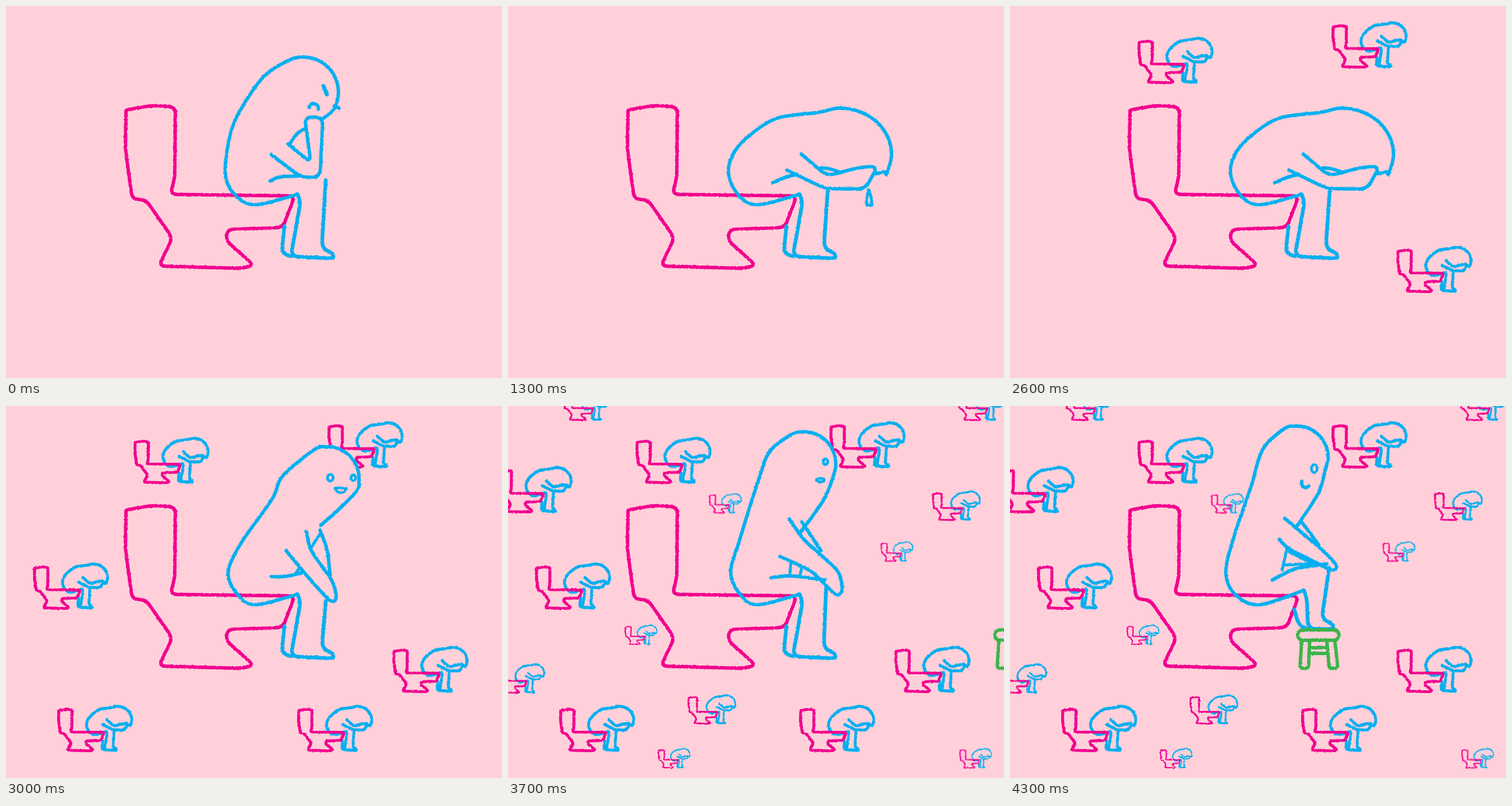
Animation, 864 px wide and 648 px high, one loop 4.8 s. Source, as an HTML page:

```html
<!DOCTYPE html>
<html lang="en">
<head>
<meta charset="utf-8">
<title>Thinking it over</title>
<style>
  html, body { margin: 0; width: 100%; height: 100%; overflow: hidden; background: #ffd0d9; }
  svg { display: block; width: 100vw; height: 100vh; }
  path, g { fill: none; stroke-linecap: round; stroke-linejoin: round; }
  .pink { stroke: #f2008f; }
  .blue { stroke: #04aff0; }
  .green { stroke: #3bb54a; }
</style>
</head>
<body>
<svg viewBox="0 0 864 648">
  <defs>
    <filter id="crayon" filterUnits="userSpaceOnUse" x="0" y="0" width="864" height="648" color-interpolation-filters="sRGB">
      <feTurbulence type="fractalNoise" baseFrequency="0.3" numOctaves="2" seed="4"/>
      <feDisplacementMap in="SourceGraphic" scale="3" xChannelSelector="R" yChannelSelector="G"/>
    </filter>
    <g id="mini">
      <path id="miniFigure" class="blue" stroke-width="18" transform="translate(-57 -57) scale(.277 .293)"/>
      <path id="miniToilet" class="pink" stroke-width="19" transform="scale(.27 .255) translate(-206 -172)"/>
    </g>
  </defs>
  <g filter="url(#crayon)">
    <g id="crowd"></g>
    <path id="fill" style="fill:#ffd0d9"/>
    <path id="toilet" class="pink" stroke-width="6"/>
    <g id="figure" class="blue"></g>
    <path id="drop" class="blue" stroke-width="5"/>
    <g id="stool" class="green" stroke-width="6"></g>
  </g>
</svg>
<script>
const LOOP = 4800, STEP = 100;
const NS = "http://www.w3.org/2000/svg";
const $ = id => document.getElementById(id);
const pts = s => s.split(" ").map(p => p.split(",").map(Number));
const lerp = (a, b, k) => a.map((v, j) => v + (b[j] - v) * k);
const shift = ([x, y], dx, dy) => [x + dx, y + dy];

function add(parent, tag, attrs) {
  const el = document.createElementNS(NS, tag);
  for (const name in attrs) el.setAttribute(name, attrs[name]);
  return $(parent).appendChild(el);
}

// points along an ellipse, angles in degrees
function arc([x, y], rx, ry, from, to, n = 6) {
  return Array.from({ length: n + 1 }, (_, i) => {
    const a = (from + (to - from) * i / n) * Math.PI / 180;
    return [x + rx * Math.cos(a), y + ry * Math.sin(a)];
  });
}
const ring = (x, y, rx, ry) => arc([x, y], rx, ry, 0, 360, 12);

// smooth curve through all points
function smooth(p) {
  let d = "M" + p[0];
  for (let i = 0; i < p.length - 1; i++) {
    const a = p[i], b = p[i + 1], before = p[i - 1] || a, after = p[i + 2] || b;
    const c1 = a.map((v, j) => v + (b[j] - before[j]) / 6);
    const c2 = b.map((v, j) => v - (after[j] - a[j]) / 6);
    d += `C${c1} ${c2} ${b}`;
  }
  return d;
}

// straight runs with rounded corners
function bent(p, r = 14) {
  const toward = (a, b) => lerp(a, b, Math.min(.5, r / Math.hypot(b[0] - a[0], b[1] - a[1])));
  let d = "M" + p[0];
  for (let i = 1; i < p.length - 1; i++)
    d += `L${toward(p[i], p[i - 1])}Q${p[i]} ${toward(p[i], p[i + 1])}`;
  return d + "L" + p[p.length - 1];
}

// a round head on a hunched back that always ends on the same seat
function pose({ head, size = [61, 61], front, back, hip, arm, far, thigh, knee,
                seat = [508, 328], heel = [496, 436], toe = [571, 440], calf = [485, 384], ...extra }) {
  return {
    body: [...pts(front), ...arc(head, ...size, 25, -115), ...pts(back),
           [hip, 290], [hip + 17, 329], [435, 346], seat],
    arm: pts(arm), far: pts(far), thigh: pts(thigh),
    leg: [seat, shift(seat, 5, 14), heel, toe, shift(toe, -1, -9), shift(toe, -21, -18), knee],
    calf: [calf, shift(heel, -16, -6), heel],
    ...extra
  };
}

const ponder = pose({
  head: [518, 150], front: "548,197 560,191", back: "452,120 420,162 393,215", hip: 382,
  arm: "462,259 515,299 547,298 552,194 520,193 531,273 491,240",
  far: "494,241 506,222 520,214", thigh: "460,305 475,297 515,296", knee: [557, 303],
  nose: pts("572,174 580,178"), eye: pts("553,139 559,154"), frown: arc([536, 178], 8, 8, -170, 10)
});
const worry = pose({
  head: [566, 178], front: "577,230 600,222", back: "470,154 425,192 393,238", hip: 379,
  arm: "474,255 500,302 540,321 577,228 552,216 530,292 506,247",
  far: "510,250 524,238 541,234", thigh: "453,304 470,299 497,298", knee: [557, 304],
  nose: pts("606,216 613,221"), eye: pts("585,199 587,207"), frown: arc([559, 213], 8, 8, -120, 20)
});
const despair = pose({
  head: [578, 258], size: [90, 80], front: "641,292 655,289", back: "470,195 425,222 395,253", hip: 384,
  arm: "486,286 552,318 622,319 644,279 612,281 556,296 511,258",
  far: "545,282 560,283 580,290", thigh: "461,308 480,299 503,293", knee: [557, 320]
});
const lookUp = pose({
  head: [560, 126], size: [55, 55], front: "548,208 572,187", back: "482,122 463,163 410,238", hip: 387,
  arm: "488,252 530,303 567,343 577,336 570,306 530,251 523,219",
  far: "547,216 560,250 565,298", thigh: "462,297 485,298 517,290", knee: [557, 340],
  gap: pts("549,220 531,248"), wrist: pts("512,281 505,291"),
  ring: ring(565, 125, 5, 6), ring2: ring(605, 125, 4, 5),
  mouth: [...arc([583, 143], 9, 8, 0, 180, 11), [592, 143]]
});
const sitUp = pose({
  head: [516, 101], size: [55, 56], front: "508,222 549,165", back: "456,79 436,130 403,235", hip: 388,
  arm: "474,262 530,288 573,332 584,322 577,288 514,232 490,197",
  far: "512,202 528,226 545,252", thigh: "458,299 490,295 552,303", knee: [554, 318],
  gap: pts("493,270 491,294"), wrist: pts("512,280 509,294"),
  ring: ring(553, 97, 4, 5), mouth: ring(544, 129, 7, 3)
});
const relief = pose({
  head: [500, 89], size: [54, 54], front: "498,212 537,152", back: "440,76 420,140 390,228", hip: 376,
  arm: "469,232 482,247 563,288 572,280 548,254 500,214 479,196",
  far: "506,200 522,220 540,246", thigh: "457,303 495,283 552,275", knee: [556, 282],
  seat: [512, 321], heel: [519, 388], toe: [564, 389], calf: [495, 354],
  gap: pts("482,250 474,286"), wrist: pts("486,254 526,274"), lap: pts("479,277 535,274"),
  ring: ring(530, 109, 5, 7), smile: arc([515, 134], 7, 8, 200, 40)
});

// start, from, to, number of steps
const moves = [
  [400, ponder, worry, 2], [900, worry, despair, 2], [2700, despair, lookUp, 4],
  [3400, lookUp, sitUp, 4], [4100, sitUp, relief, 3]
];

const toilet = bent(pts("210,181 255,173 295,176 294,300 286,328 503,331 482,386 386,389 383,408 432,452 410,457 266,453 290,404 243,337 220,337 208,250 209,183"), 12);
$("toilet").setAttribute("d", toilet);
$("miniToilet").setAttribute("d", toilet);
$("miniFigure").setAttribute("d",
  smooth(despair.body) + [despair.arm, despair.leg, despair.calf].map(p => bent(p)).join(""));

// seat, two legs and two rungs
add("stool", "rect", { x: 501, y: 390, width: 72, height: 18, rx: 9 });
for (const [x, lean] of [[508, -3], [552, 4]])
  add("stool", "path", { d: bent([[x, 410], [x + lean, 457], [x + lean + 15, 457], [x + 14, 410]], 6) });
for (const y of [421, 431]) add("stool", "path", { d: `M523 ${y}H550` });

// copies arrive from large to small
const minis = pts("562,34 224,61 675,425 49,280 509,528 91,528 -18,112 740,152 314,507 97,-22 784,-22 -19,453 351,155 787,599 204,384 650,239 262,599")
  .map(([x, y], i) => {
    const scale = i < 7 ? 1 : i < 12 ? .64 : .43;
    const start = i === 0 ? 2200 : i < 6 ? 2400 + i * STEP : 3100 + (i - 6) * STEP / 2;
    const el = add("crowd", "use", { href: "#mini", transform: `translate(${x} ${y}) scale(${scale})` });
    return { start, el };
  });

const curved = ["body", "ring", "ring2", "mouth", "frown", "smile"];
const widths = { leg: 6.5, calf: 6.5, eye: 7, ring: 4.5, ring2: 4.5, mouth: 4.5, wrist: 5, gap: 5, lap: 5 };
const lines = {};
for (const key of new Set(moves.flatMap(m => [...Object.keys(m[1]), ...Object.keys(m[2])])))
  lines[key] = add("figure", "path", { "stroke-width": widths[key] || 6 });

function mix(a, b, k) {
  if (k === 1) return b;
  const shared = Object.keys(a).filter(key => b[key]);
  return Object.fromEntries(shared.map(key => [key, a[key].map((p, i) => lerp(p, b[key][i], k))]));
}

function poseAt(t) {
  const move = moves.filter(m => t >= m[0]).pop();
  if (!move) return ponder;
  const [start, from, to, steps] = move;
  return mix(from, to, Math.min(1, ((t - start) / STEP + 1) / steps));
}

// falls for four steps, then splashes for three
function dropAt(t) {
  const n = (t - 1300) / STEP;
  if (n < 0 || n > 6) return "";
  if (n < 4) {
    const y = 320 + 25 * n + 2 * n * n;
    return `M628 ${y}Q624 ${y + 14} 625 ${y + 27}L634 ${y + 27}Q634 ${y + 14} 628 ${y}`;
  }
  const r = 12 + (n - 4) * 6, end = r + 14 - (n - 4) * 4;
  const inner = arc([629, 443], r, r * .6, -145, -35, 2), outer = arc([629, 443], end, end * .8, -145, -35, 2);
  return inner.map((p, i) => `M${p}L${outer[i]}`).join("");
}

// slides in, waits, then tucks under the feet
function stoolAt(t) {
  if (t < 3700) return 400;
  if (t < 4100) return Math.max(78, 347 - 1.35 * (t - 3700));
  return Math.max(0, 52 - .26 * (t - 4100));
}

function draw(t) {
  const now = poseAt(t);
  for (const key in lines)
    lines[key].setAttribute("d", !now[key] ? "" : curved.includes(key) ? smooth(now[key]) : bent(now[key]));
  $("fill").setAttribute("d", smooth(now.body));
  $("drop").setAttribute("d", dropAt(t));
  $("stool").setAttribute("transform", `translate(${stoolAt(t)} 0)`);
  for (const m of minis) m.el.style.display = t >= m.start ? "" : "none";
}

const begin = performance.now();
let last = -1;
function tick() {
  const t = Math.floor((performance.now() - begin) % LOOP / STEP) * STEP;
  if (t !== last) draw(last = t);
  requestAnimationFrame(tick);
}
tick();
</script>
</body>
</html>
```
